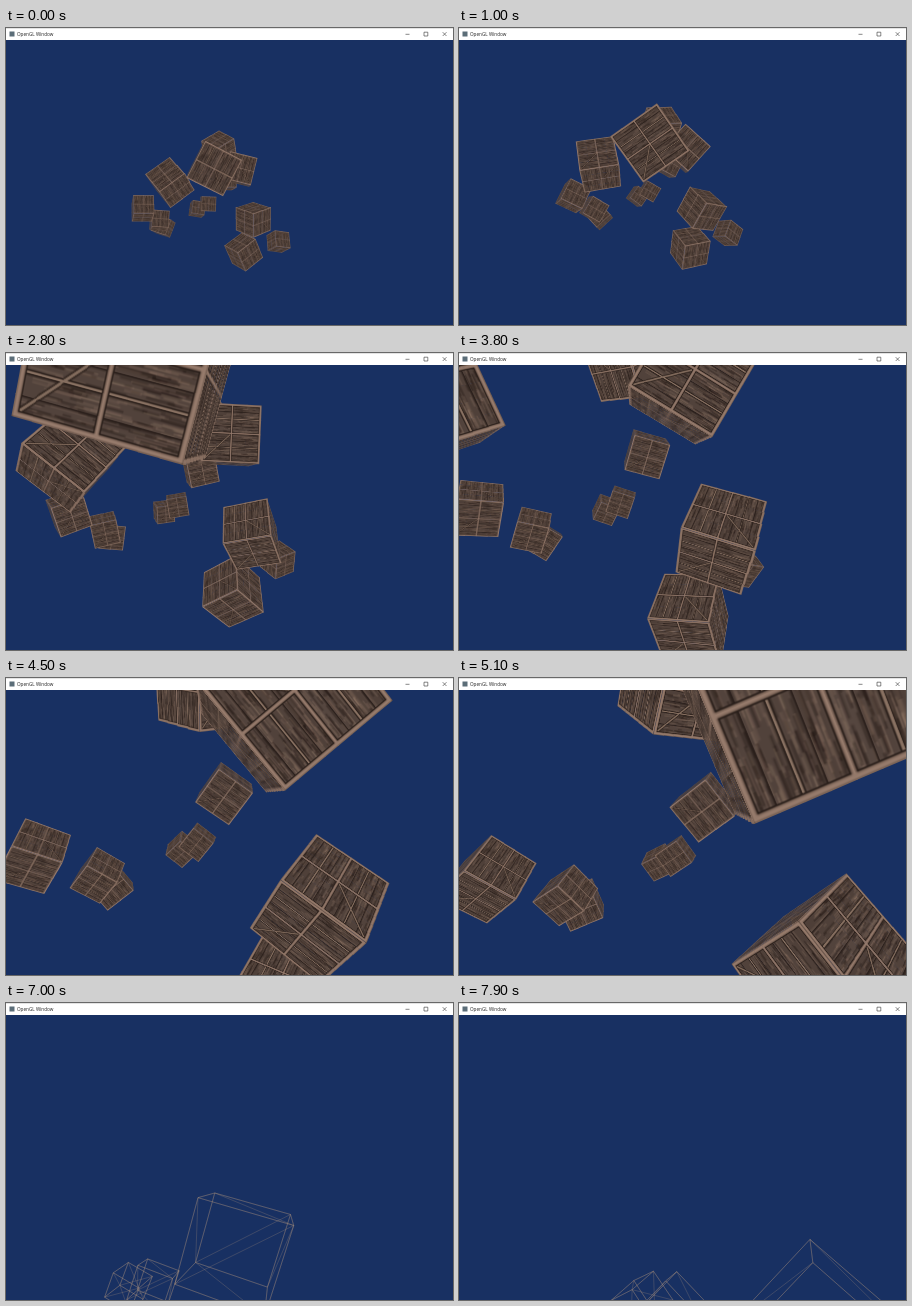
An HTML page with a canvas that plays this animation: 447 by 297 pixels, repeating every 8 s.

```html
<!DOCTYPE html>
<html>
<head>
<meta charset="utf-8">
<style>
  html, body { margin: 0; width: 100%; height: 100%; overflow: hidden; background: #183062; }
  canvas { position: absolute; left: 0; top: 0; }
  header {
    position: absolute; left: 0; top: 0; width: 447px; height: 12px; background: #fff;
    font: 4.650px/12px "Open Sans", "Noto Sans", sans-serif; color: #222;
  }
  header span { position: absolute; left: 11px; top: 0; white-space: nowrap; }
  header svg { position: absolute; left: 0; top: 0; }
</style>
</head>
<body>
<canvas id="view" width="447" height="297"></canvas>
<header>
  <svg width="447" height="12" fill="none" stroke="#333" stroke-width=".6">
    <rect x="3.500" y="3.500" width="5" height="5" fill="#5b6d78" stroke="none"/>
    <path d="M399.500 6.300h4M418 4.200h3.800v3.800h-3.800zM436.700 4.200l3.800 3.800m0-3.800l-3.800 3.800"/>
    <path d="M0 .2H447" stroke="#999" stroke-width=".4"/>
  </svg>
  <span>OpenGL Window</span>
</header>
<script>
const ctx = document.getElementById('view').getContext('2d');
const LOOP = 8, WIRE_FROM = 5.7, FOCAL = 344, SPIN = 28;

// Camera flight: time, vanishing point on screen, then position right, down and forward.
const flight = [
  [0, 223.5, 154.5, 0, 0, 0],
  [1.9, 205.5, 129, 0, .25, 4.4],
  [2.8, 201, 129.5, 0, .37, 6.6],
  [3.8, 196, 130, 0, .7, 9],
  [5.1, 255, 143, -.05, .2, 11],
  [6.3, 113, 225, -1, -.1, 13.3],
  [8, 243, 177, -1.04, -1.34, 17]
];

// Crates stand still while spinning: position, then yaw, pitch, and roll at three seconds.
const crates = [
  [-.45, -1.45, 15.1, 35, 40, 74],
  [-.42, -.4, 8.9, -5, 8, 21],
  [.38, -.48, 13, 4, 0, 8],
  [-2.05, 0, 11.8, 15, -35, 38],
  [-4.5, 1.35, 17.8, 30, 20, -4],
  [-4.25, 2.3, 20.8, 20, 18, 0],
  [-4.2, 2.8, 21.8, 15, -12, 10],
  [-2.5, 2.05, 26.5, 20, 15, 5],
  [-1.54, 1.54, 24.5, 5, 10, -3],
  [.98, 1.52, 14.2, -20, 40, -20],
  [3.05, 3.7, 21.5, 30, 22, 5],
  [.61, 3, 14.9, -25, 25, -39],
  [-.26, -.15, 18.9, 10, 15, -5]
];

function makeTexture(size) {
  const tex = document.createElement('canvas'), g = tex.getContext('2d');
  tex.width = tex.height = size;
  g.scale(size / 128, size / 128);
  let seed = 7;
  const rnd = () => (seed = seed * 16807 % 2147483647) / 2147483647;
  for (let i = 0; i < 8; i++) {
    const shade = 66 + rnd() * 18;
    g.fillStyle = `rgb(${shade + 12},${shade - 3},${shade - 10})`;
    g.fillRect(i * 16, 0, 16, 128);
    for (let k = 0; k < 60; k++) {
      g.fillStyle = rnd() < .5 ? 'rgba(25,17,14,.32)' : 'rgba(155,128,110,.22)';
      g.fillRect(i * 16 + rnd() * 15, rnd() * 128, 1.5, 6 + rnd() * 24);
    }
    g.fillStyle = '#2a1f1b';
    g.fillRect(i * 16, 0, 1.4, 128);
  }
  const beam = (path, color, width) => {
    g.strokeStyle = color;
    g.lineWidth = width;
    g.stroke(new Path2D(path));
  };
  const frame = 'M2 2H126V126H2ZM64 2V126M2 64H126', slats = 'M33 2V126M95 2V126M64 64L126 2';
  beam(slats, '#2c211c', 4);
  beam(slats, '#846d5e', 2);
  beam(frame, '#2c211c', 6);
  beam(frame, '#94796a', 3.4);
  return tex;
}
const fine = makeTexture(128), coarse = makeTexture(48);

function axes(yaw, pitch, roll) {
  const [a, b, r] = [yaw, pitch, roll].map(d => d * Math.PI / 180);
  const { sin, cos } = Math;
  return [
    [cos(a), -sin(a) * sin(b), sin(a) * cos(b)],
    [-sin(a), -cos(a) * sin(b), cos(a) * cos(b)],
    [0, cos(b), sin(b)]
  ].map(([x, y, z]) => [x * cos(r) - y * sin(r), x * sin(r) + y * cos(r), z]);
}

function cameraAt(t) {
  const k = flight.findIndex(key => key[0] > t);
  const p = flight[k - 1], q = flight[k];
  const f = (t - p[0]) / (q[0] - p[0]);
  return p.map((v, i) => v + (q[i] - v) * f).slice(1);
}

function drawFace(at, size, wire) {
  if (wire) {
    ctx.beginPath();
    [[0, 0], [1, 0], [1, 1], [0, 1], [0, 0], [1, 1]].forEach(uv => ctx.lineTo(...at(...uv)));
    ctx.stroke();
    return;
  }
  const n = size < 30 ? 2 : size < 80 ? 4 : 8;
  const tex = size < 45 ? coarse : fine, w = tex.width / n;
  for (let i = 0; i < n; i++) for (let j = 0; j < n; j++) {
    const o = at(i / n, j / n), u = at((i + 1) / n, j / n), v = at(i / n, (j + 1) / n);
    ctx.setTransform(u[0] - o[0], u[1] - o[1], v[0] - o[0], v[1] - o[1], ...o);
    ctx.drawImage(tex, i * w, j * w, w, w, 0, 0, 1.04, 1.04);
  }
  ctx.setTransform(1, 0, 0, 1, 0, 0);
}

function drawCrate({ centre, dirs }, vx, vy, wire) {
  for (let k = 0; k < 3; k++) for (const side of [-1, 1]) {
    const n = dirs[k], u = dirs[(k + 1) % 3], v = dirs[(k + 2) % 3];
    const mid = centre.map((c, i) => c + n[i] * side / 2);
    const facing = side * (n[0] * mid[0] + n[1] * mid[1] + n[2] * mid[2]);
    if (!wire && facing >= 0) continue;
    drawFace((s, t) => {
      const p = mid.map((m, i) => m + u[i] * (s - .5) + v[i] * (t - .5));
      return [vx + p[0] * FOCAL / p[2], vy + p[1] * FOCAL / p[2]];
    }, FOCAL / centre[2], wire);
  }
}

function draw(seconds) {
  const t = Math.floor(seconds % LOOP * 10) / 10;
  const wire = t >= WIRE_FROM;
  const [vx, vy, ...eye] = cameraAt(t);
  ctx.fillStyle = '#183062';
  ctx.fillRect(0, 0, 447, 297);
  ctx.strokeStyle = 'rgba(178,148,126,.42)';
  ctx.lineWidth = .6;
  ctx.imageSmoothingQuality = 'high';
  crates.map(([x, y, z, yaw, pitch, roll]) => ({
    centre: [x - eye[0], y - eye[1], z - eye[2]],
    dirs: axes(yaw, pitch, roll + SPIN * (t - 3))
  }))
    .filter(c => c.centre[2] > 1)
    .sort((a, b) => b.centre[2] - a.centre[2])
    .forEach(c => drawCrate(c, vx, vy, wire));
}

const start = performance.now();
function tick() {
  draw((performance.now() - start) / 1000);
  requestAnimationFrame(tick);
}
tick();
</script>
</body>
</html>
```
